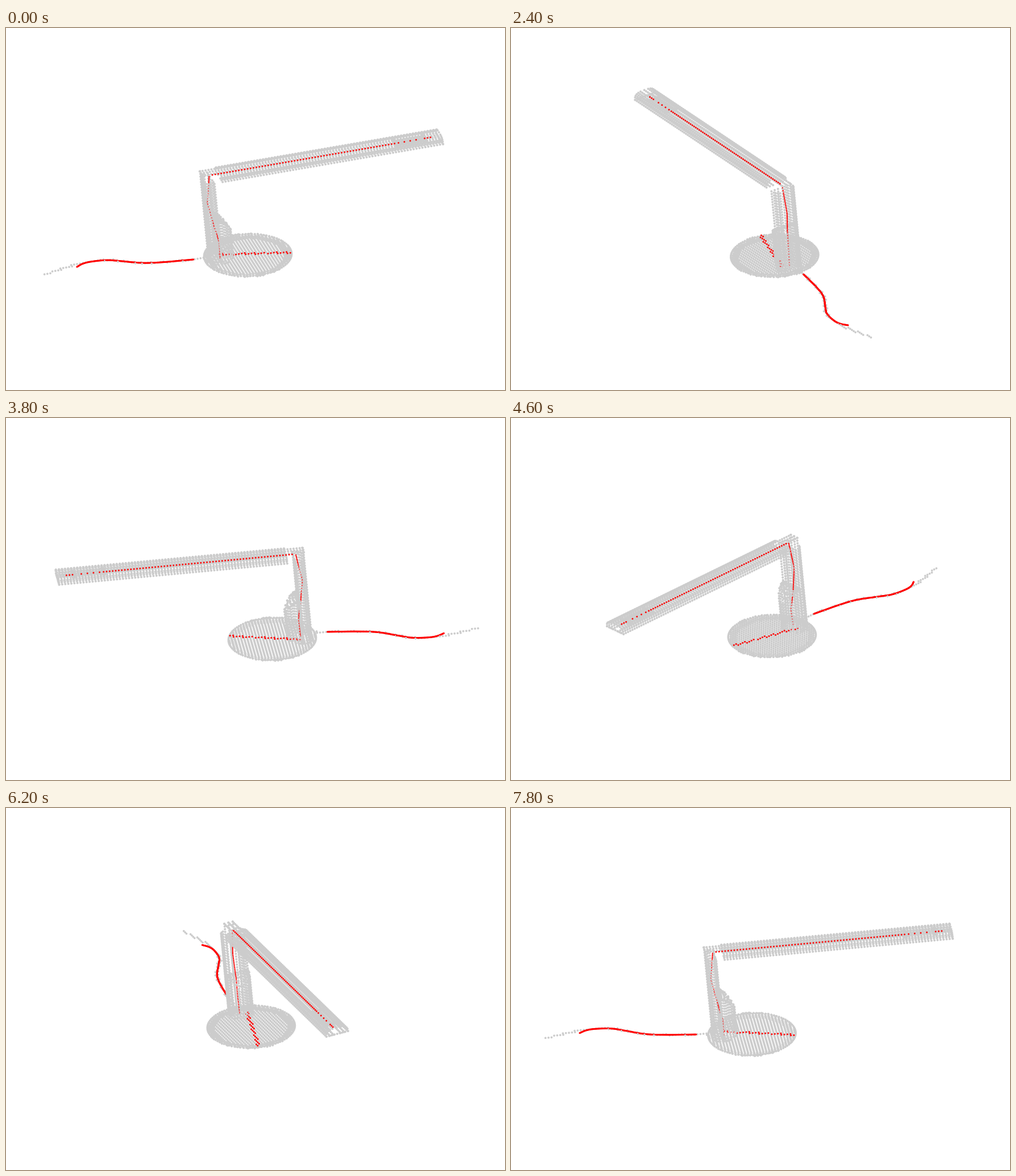
Write a matplotlib script that moves like this. It is 878 px wide and 638 px high and loops after 8000 ms.

```python
import numpy as np
import matplotlib.pyplot as plt
from matplotlib.animation import FuncAnimation

W, H, DPI = 878, 638, 64
FRAMES, INTERVAL = 40, 200
STEP = 5.4                      # spacing of the point cloud
TURN = np.radians(16.8)         # arm heading at the start
GREY, RED = (0.8, 0.8, 0.8), (1.0, 0.0, 0.0)


def to_world(d, w, h):
    """Arm-aligned coordinates (along, across, height) to world."""
    c, s = np.cos(TURN), np.sin(TURN)
    d, w, h = np.broadcast_arrays(d, w, h)
    return np.column_stack([(d * c - w * s).ravel(), (d * s + w * c).ravel(),
                            np.asarray(h, float).ravel()])


def snap(pts, h):
    """Pull points onto the arm-aligned grid, dropping repeats."""
    c, s = np.cos(TURN), np.sin(TURN)
    d = pts[:, 0] * c + pts[:, 1] * s
    w = -pts[:, 0] * s + pts[:, 1] * c
    cells = np.unique(np.round(np.column_stack([d, w]) / STEP), axis=0) * STEP
    return to_world(cells[:, 0], cells[:, 1], h)


def resample(pts, gap):
    pts = np.asarray(pts, float)
    dist = np.r_[0, np.cumsum(np.linalg.norm(np.diff(pts, axis=0), axis=1))]
    t = np.arange(0, dist[-1] + 1e-6, gap)
    return np.column_stack([np.interp(t, dist, col) for col in pts.T])


def smooth(pts, n=16):
    """Catmull-Rom curve through the points."""
    p = np.asarray(pts, float)
    p = np.vstack([2 * p[0] - p[1], p, 2 * p[-1] - p[-2]])
    t = np.linspace(0, 1, n, endpoint=False)[:, None]
    parts = []
    for a, b, c, d in zip(p, p[1:], p[2:], p[3:]):
        parts.append(0.5 * (2 * b + (c - a) * t + (2 * a - 5 * b + 4 * c - d) * t**2
                            + (3 * b - a - 3 * c + d) * t**3))
    return np.vstack(parts + [p[-2:-1]])


def profile(n=13, power=0.7):
    """Half section shared by arm and stalk: (across, bulge) pairs."""
    t = np.linspace(0, np.pi, n)
    cos, sin = np.cos(t), np.abs(np.sin(t))
    return zip(21 * np.sign(cos) * np.abs(cos)**power, sin**power)


def make_arm():
    parts = []
    along = np.arange(345, -95, -STEP)
    for w, bulge in profile():
        start = -93 if abs(w) < 10 else -62
        parts.append(to_world(along[along > start], w, 142 + 11 * bulge))
    # underside and the lamp head in the far end
    for w in (-14, -7, 7, 14):
        parts.append(to_world(along[along > -62], w, 142))
    d, w = np.meshgrid(np.arange(264, 320, STEP), np.arange(-11, 12, STEP))
    parts.append(to_world(d, w, 146))
    for d in (262, 265, 316, 319):
        parts.append(to_world(d, np.linspace(-12, 12, 7), 148))
    parts.append(to_world(345, np.linspace(-21, 21, 9), 142))
    return np.vstack(parts)


def make_stalk():
    parts = []
    rise = STEP * 0.875
    for w, bulge in profile():
        top = 153 if abs(w) < 10 else 141
        parts.append(to_world(-75 - 17 * bulge, w, np.arange(top, -1, -rise)))
    for w in (-14, -7, 7, 14):
        parts.append(to_world(-75, w, np.arange(141, -1, -rise)))
    # lower front cover with a rounded shoulder
    for w, bulge in profile(power=1):
        top = 72 - 24 * bulge**2
        parts.append(to_world(-76 + 27 * bulge, w, np.arange(top, -1, -rise)))
        k = np.linspace(0, 1, 6)
        parts.append(to_world(-76 + 27 * bulge * k, w, 72 - 24 * (bulge * k)**2))
    return np.vstack(parts)


def make_base():
    d0, w0, r = -23.2, -5.3, 77
    g = np.arange(-14, 15) * STEP
    d, w = np.meshgrid(g, g)
    dist = np.hypot(d, w)
    top, under = dist < r - 1, (dist < r - 1) & (dist > r - 13)
    a = np.linspace(0, 2 * np.pi, 90, endpoint=False)
    return np.vstack([
        to_world(d0 + d[top], w0 + w[top], 1.5),
        to_world(d0 + d[under], w0 + w[under], -2),
        to_world(d0 + r * np.cos(a), w0 + r * np.sin(a), 0)])


cord = [(-116, -35), (-171, -42), (-206, -42.5), (-243, -34), (-268, -29),
        (-296, -33), (-311, -40), (-321, -51)]
cord_red = smooth(cord)
tail = smooth([(-96, -32)] + cord[:-2] + [(-334, -48), (-355, -62), (-377, -74)])

arm_red = to_world(np.r_[np.arange(-72, 266, STEP), np.arange(270, 308, 2 * STEP),
                         np.arange(318, 331, STEP)], 0, 147)
stalk_red = resample([(-75, -23, 145), (-82, -25, 100), (-75, -24, 60),
                      (-68, -25, 30), (-69, -24, 1)], 2.5)
base_red = snap(resample([(54, -10.3), (-68, -11)], 1.0), 2)
wire_red = resample(np.column_stack([cord_red, np.full(len(cord_red), 6.0)]), 1.2)

# points, colour, dot width in pixels, pull towards the viewer
layers = [
    (make_arm(), GREY, 4.0, 0),
    (make_stalk(), GREY, 4.0, 0),
    (make_base(), GREY, 4.0, 0),
    (snap(resample(tail, 1.0), 6), GREY, 3.7, 0),
    (arm_red, RED, 2.9, 40),
    (stalk_red, RED, 2.4, 17),
    (base_red, RED, 3.0, 6),
    (wire_red, RED, 3.1, 2),
]
points = np.vstack([p for p, *_ in layers])
colors = np.vstack([np.tile(c, (len(p), 1)) for p, c, *_ in layers])
sizes = np.concatenate([np.full(len(p), (s * 72 / DPI)**2) for p, _, s, _ in layers])
pull = np.concatenate([np.full(len(p), float(b)) for p, _, _, b in layers])


def project(angle):
    c, s = np.cos(angle), np.sin(angle)
    x, y, h = points.T
    x, y = x * c - y * s, x * s + y * c
    screen = np.column_stack([446.2 + x - 0.096 * h,
                              394 - h - 0.483 * y - 0.0266 * x])
    return screen, -0.875 * y + 0.55 * h + pull


fig = plt.figure(figsize=(W / DPI, H / DPI), dpi=DPI, facecolor="white")
ax = fig.add_axes([0, 0, 1, 1])
ax.set(xlim=(0, W), ylim=(H, 0))
ax.axis("off")
cloud = ax.scatter(points[:, 0], points[:, 1], s=sizes, c=colors, linewidths=0)


def update(i):
    screen, depth = project(2 * np.pi * i / FRAMES)
    order = np.argsort(depth, kind="stable")
    cloud.set_offsets(screen[order])
    cloud.set_facecolors(colors[order])
    cloud.set_sizes(sizes[order], DPI)
    return (cloud,)


anim = FuncAnimation(fig, update, frames=FRAMES, interval=INTERVAL,
                     repeat=True, repeat_delay=0, blit=False)
plt.show()
```
